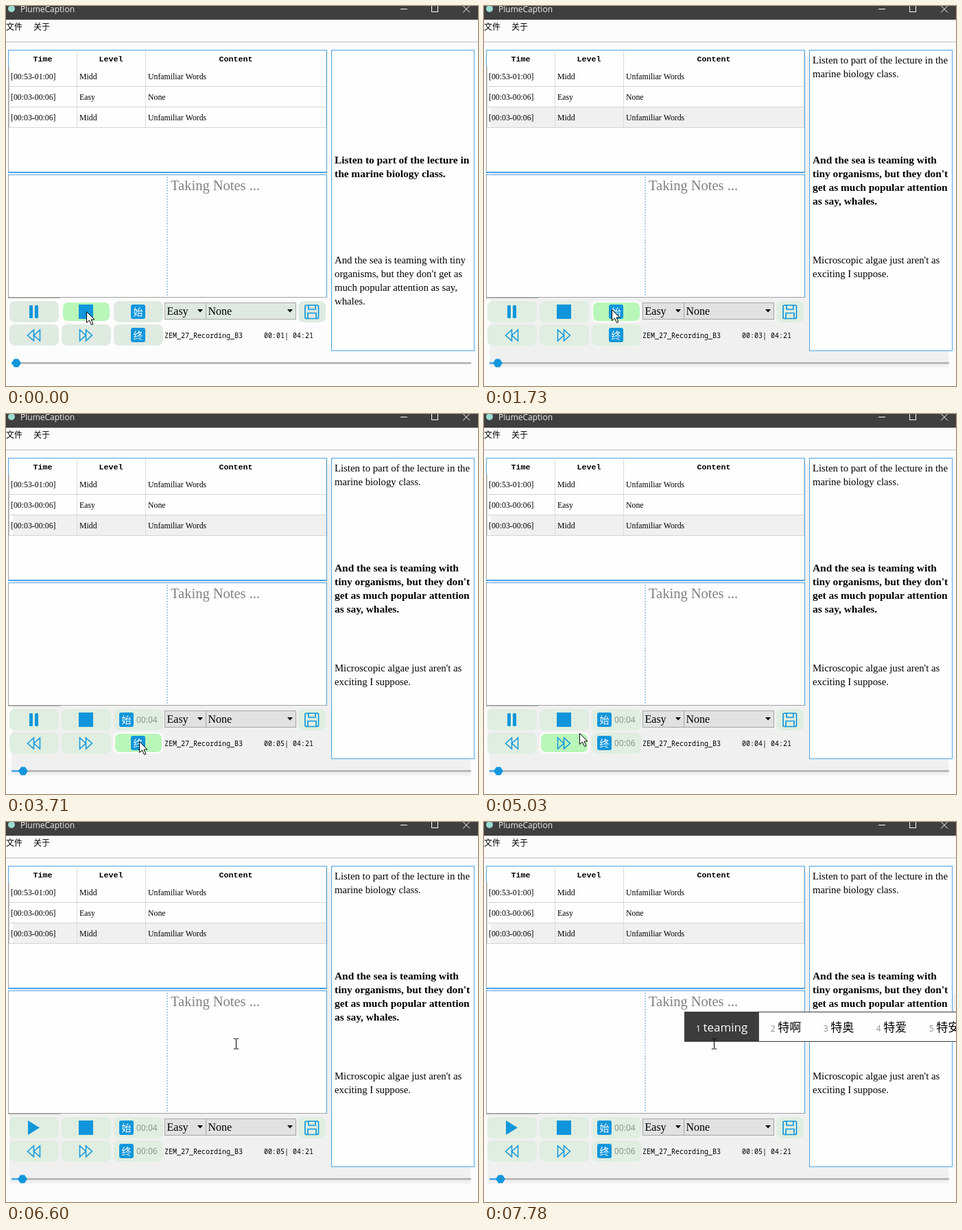
Animation, 688 px wide and 555 px high, one loop 8 s. Source, as an HTML page with a canvas:

```html
<!DOCTYPE html>
<html lang="en">
<head>
<meta charset="utf-8">
<style>
html, body { margin: 0; width: 100%; height: 100%; overflow: hidden; background: #fcfcfc; }
canvas { display: block; }
</style>
</head>
<body>
<canvas id="stage" width="688" height="555"></canvas>
<script>
const c = document.getElementById('stage').getContext('2d');
const LOOP = 8000;
const BLUE = '#1296db', EDGE = '#4ea3e4', GREY = '#f0f0f0', BACK = '#fcfcfc', PANEL = '#fefefe';
const SERIF = '"Liberation Serif", serif';
const SANS = '"Open Sans", "Noto Sans CJK SC", "Noto Sans CJK", sans-serif';
const CJK = '"Noto Sans CJK SC", "Noto Sans CJK", sans-serif';
const MONO = '"Noto Sans Mono", monospace';

// Stepped tracks: [start time, values...]
const pointer = [
  [0, 117, 446], [120, 139, 448], [240, 165, 445], [360, 186, 443],
  [2720, 188, 452], [2840, 191, 468], [2960, 194, 478],
  [4910, 165, 472], [5030, 139, 466], [5150, 100, 458], [5270, 65, 450], [5390, 45, 445],
  [5750, 105, 418], [5870, 195, 388], [5990, 285, 345], [6110, 335, 324]
];
const playback = [
  [0, 1, 15], [730, 2, 17], [1730, 3, 20], [2720, 4, 22],
  [3710, 5, 25], [4550, 4, 21], [5630, 5, 24]
];
const caret = [[0, 0], [6110, 240], [6600, 0], [7180, 255], [7300, 264], [7420, 280], [7660, 0]];
const tail = ['特啊', '特奥', '特爱', '特安', '特案', '特昂'];
const popup = [
  [0, 0], [7180, 251, ['特', '忒', '铽', '慝', '忑', '特别', '特点']],
  [7300, 260, tail], [7420, 276, ['team', ...tail]],
  [7660, 282, ['teaming', ...tail]], [7780, 292, ['teaming', ...tail]]
];
// Areas that turn grey: [time, left, top, right, bottom]
const greyed = [
  [730, 8, 477, 406, 528], [1730, 10, 73, 677, 528],
  [4910, 5, 431, 229, 496], [5630, 5, 427, 406, 528], [7180, 683, 251, 688, 321]
];
const lecture = [
  ['Listen to part of the lecture in the', 'marine biology class.'],
  ['And the sea is teaming with', "tiny organisms, but they don't", 'get as much popular attention', 'as say, whales.'],
  ["Microscopic algae just aren't as", 'exciting I suppose.']
];
const opening = [
  [],
  ['Listen to part of the lecture in', 'the marine biology class.'],
  ['And the sea is teaming with tiny', "organisms, but they don't get as", 'much popular attention as say,', 'whales.']
];

const at = (track, t) => track.filter(s => s[0] <= t).pop().slice(1);
const clock = s => '00:' + String(s).padStart(2, '0');

function rect(x, y, w, h, color) {
  c.fillStyle = color;
  c.fillRect(x, y, w, h);
}
function frame(x, y, w, h, color) {
  c.strokeStyle = color;
  c.lineWidth = 1;
  c.strokeRect(x + .5, y + .5, w - 1, h - 1);
}
function round(x, y, w, h, r, color) {
  c.fillStyle = color;
  c.beginPath();
  c.roundRect(x, y, w, h, r);
  c.fill();
}
function text(s, x, y, font, color = '#000', align = 'left') {
  c.font = font;
  c.fillStyle = color;
  c.textAlign = align;
  c.fillText(s, x, y);
}
function path(points, fill, stroke, width = 1) {
  c.beginPath();
  points.forEach(([x, y]) => c.lineTo(x, y));
  c.closePath();
  if (fill) { c.fillStyle = fill; c.fill(); }
  if (stroke) { c.strokeStyle = stroke; c.lineWidth = width; c.stroke(); }
}
function lines(list, y, font) {
  list.forEach((s, i) => text(s, 479, y + i * 20, font));
}

function windowBar() {
  rect(0, 0, 688, 20, '#3f3f3f');
  c.fillStyle = '#9adccf';
  c.beginPath();
  c.arc(8, 4, 5, 0, 7);
  c.fill();
  text('PlumeCaption', 21, 9, '12px ' + SANS, '#f0f0f0');
  rect(575, 4, 10, 1, '#fff');
  frame(620, -1, 10, 10, '#fff');
  c.beginPath();
  c.moveTo(666, -.5); c.lineTo(676, 9.5);
  c.moveTo(676, -.5); c.lineTo(666, 9.5);
  c.stroke();
  text('文件', 0, 35, '12px ' + CJK);
  text('关于', 40, 35, '12px ' + CJK);
  rect(0, 52, 688, 1, '#bcbcbc');
}

function table(t) {
  rect(3, 64, 465, 180, PANEL);
  if (t >= 1730) rect(10, 148, 456, 29, GREY);
  rect(4, 88, 1, 90, '#c4c4c4');
  for (const x of [103, 203, 466]) rect(x, 66, 1, 112, '#dadada');
  for (const y of [117, 147, 177]) rect(4, y, 463, 1, '#d4d4d4');
  frame(3, 64, 465, 179, EDGE);
  rect(3, 242, 465, 2, EDGE);
  rect(3, 88, 1, 154, '#a0a0a0');
  const bold = 'bold 11.67px "Liberation Mono", monospace';
  [['Time', 53.5], ['Level', 153], ['Content', 335]].forEach(([s, x]) => text(s, x, 81, bold, '#000', 'center'));
  const rows = [
    ['[00:53-01:00]', 'Midd', 'Unfamiliar Words'],
    ['[00:03-00:06]', 'Easy', 'None'],
    ['[00:03-00:06]', 'Midd', 'Unfamiliar Words']
  ];
  rows.forEach((row, i) => row.forEach((s, j) =>
    text(s, [7, 107, 207][j], 107 + i * 30, '11.8px ' + SERIF)));
}

function notes(t) {
  rect(3, 246, 465, 180, PANEL);
  frame(3, 246, 465, 180, EDGE);
  rect(3, 247, 1, 179, '#a0a0a0');
  rect(3, 425, 465, 1, '#a0a0a0');
  rect(3, 426, 76, 1, '#b0b0b0');
  for (let y = 249; y < 425; y += 4) rect(234, y, 2, 2, '#a9cdea');
  text('Taking Notes ...', 240, 269, '20.5px ' + SERIF, '#808080');
  const [x] = at(caret, t);
  if (x) rect(x, 251, 1, 23, '#000');
}

function transcript(t) {
  rect(474, 64, 209, 440, PANEL);
  frame(474, 64, 209, 440, EDGE);
  const [before, now, next] = t < 1730 ? opening : lecture;
  lines(before, 84, '14.75px ' + SERIF);
  lines(now, 230, 'bold 15.4px ' + SERIF);
  lines(next, 376, '14.75px ' + SERIF);
}

function badge(glyph, x, y, time) {
  const left = time ? x + 8 : x + 25;
  round(left, y + 5, 21, 21, 3, BLUE);
  text(glyph, left + 10.5, y + 20.5, '14px ' + CJK, '#fff', 'center');
  if (time) text(time, x + 33, y + 20, '12px ' + SANS, '#8a8f8a');
}
function doubleArrow(cx, cy, dir) {
  for (const tip of [-9, 0]) {
    const p = dir < 0 ? tip : -tip;
    path([[cx + p, cy], [cx + p - dir * 9, cy - 8], [cx + p - dir * 9, cy + 8]], null, BLUE, 1.5);
  }
}
function saveIcon() {
  c.strokeStyle = BLUE;
  c.lineWidth = 1.7;
  c.beginPath();
  c.roundRect(436, 437, 19.5, 19.5, 2);
  c.rect(441, 437, 10, 6);
  c.rect(440, 448.5, 12, 8);
  c.stroke();
}

const buttons = [
  [5, 431, 72, t => {
    if (t < 5630) [34, 42].forEach(x => round(x, 437, 5, 19, 1.5, BLUE));
    else path([[32, 436], [49, 446.5], [32, 457]], BLUE);
  }],
  [81, 431, 72, () => rect(106, 436, 21, 21, BLUE)],
  [157, 431, 72, t => badge('始', 157, 431, t >= 2110 && '00:04')],
  [426, 431, 40, saveIcon],
  [5, 465, 72, () => doubleArrow(40.5, 481, -1)],
  [81, 465, 72, () => doubleArrow(116.5, 481, 1)],
  [157, 465, 72, t => badge('终', 157, 465, t >= 4550 && '00:06')]
];

function combo(x, w, label, fill) {
  rect(x, 433, w, 25, fill);
  frame(x, 433, w, 25, '#a6a6a6');
  text(label, x + 3.5, 451, '16px ' + SERIF);
  const a = x + w - 13;
  path([[a, 443], [a + 8, 443], [a + 4, 447.5]], '#000');
}

function controls(t, px, py) {
  for (const [x, y, w, icon] of buttons) {
    const over = px >= x && px < x + w && py >= y && py < y + 31;
    if (over) {
      round(x, y, w, 31, 8, '#fefefe');
      round(x + 2, y + 2, w - 4, 27, 7, '#b9f6b9');
    } else {
      round(x, y, w, 31, 8, t < 1730 ? '#dfeae1' : '#dfeee0');
    }
    icon(t);
  }
  const fill = t < 1730 ? '#dfe8e0' : '#e1e1e1';
  combo(231, 61, 'Easy', fill);
  combo(291, 132, 'None', fill);

  const [sec, x] = at(playback, t);
  text('ZEM_27_Recording_B3', 231, 485, '10px ' + MONO);
  text(clock(sec) + '| 04:21', 376, 485, '10px ' + MONO);
  rect(8, 520, 670, 3, '#bababa');
  rect(8, 520, x - 8, 3, '#5aaee6');
  path([[x - 7, 521.5], [x - 3, 515.5], [x + 3, 515.5], [x + 7, 521.5], [x + 3, 527.5], [x - 3, 527.5]], BLUE);
}

function suggestions(t) {
  const [x, words] = at(popup, t);
  if (!x) return;
  rect(x, 277, 700, 44, PANEL);
  rect(x, 277, 700, 1, '#3c3c3c');
  rect(x, 320, 700, 1, '#3c3c3c');
  let left = x;
  words.forEach((word, i) => {
    c.font = '17px ' + SANS;
    const w = c.measureText(word).width;
    if (!i) rect(x, 277, w + 44, 44, '#3c3c3c');
    text(i + 1, left + 17, 306, '12px ' + SANS, i ? '#8a8a8a' : '#fff');
    text(word, left + 27.5, 306, '17px ' + SANS, i ? '#000' : '#fff');
    left += w + (i ? 43 : 44);
  });
}

function drawPointer(x, y) {
  if (y < 426) {
    rect(x, y - 7, 1, 14, '#000');
    for (const dy of [-8, 7]) {
      rect(x - 3, y + dy, 3, 1, '#000');
      rect(x + 1, y + dy, 3, 1, '#000');
    }
    return;
  }
  const shape = [[0, 0], [0, 16], [4, 12.5], [7, 19], [9.5, 18], [6.5, 11.5], [11.5, 11.5]];
  path(shape.map(([a, b]) => [x + a + .5, y + b + .5]), '#fff', '#000');
}

function draw(t) {
  const [px, py] = at(pointer, t);
  rect(0, 0, 688, 555, BACK);
  for (const [from, l, top, r, b] of greyed)
    if (t >= from) rect(l, top, r - l, b - top, GREY);
  windowBar();
  table(t);
  notes(t);
  transcript(t);
  controls(t, px, py);
  suggestions(t);
  drawPointer(px, py);
}

const start = performance.now();
function tick() {
  draw((performance.now() - start) % LOOP);
  requestAnimationFrame(tick);
}
tick();
</script>
</body>
</html>
```
